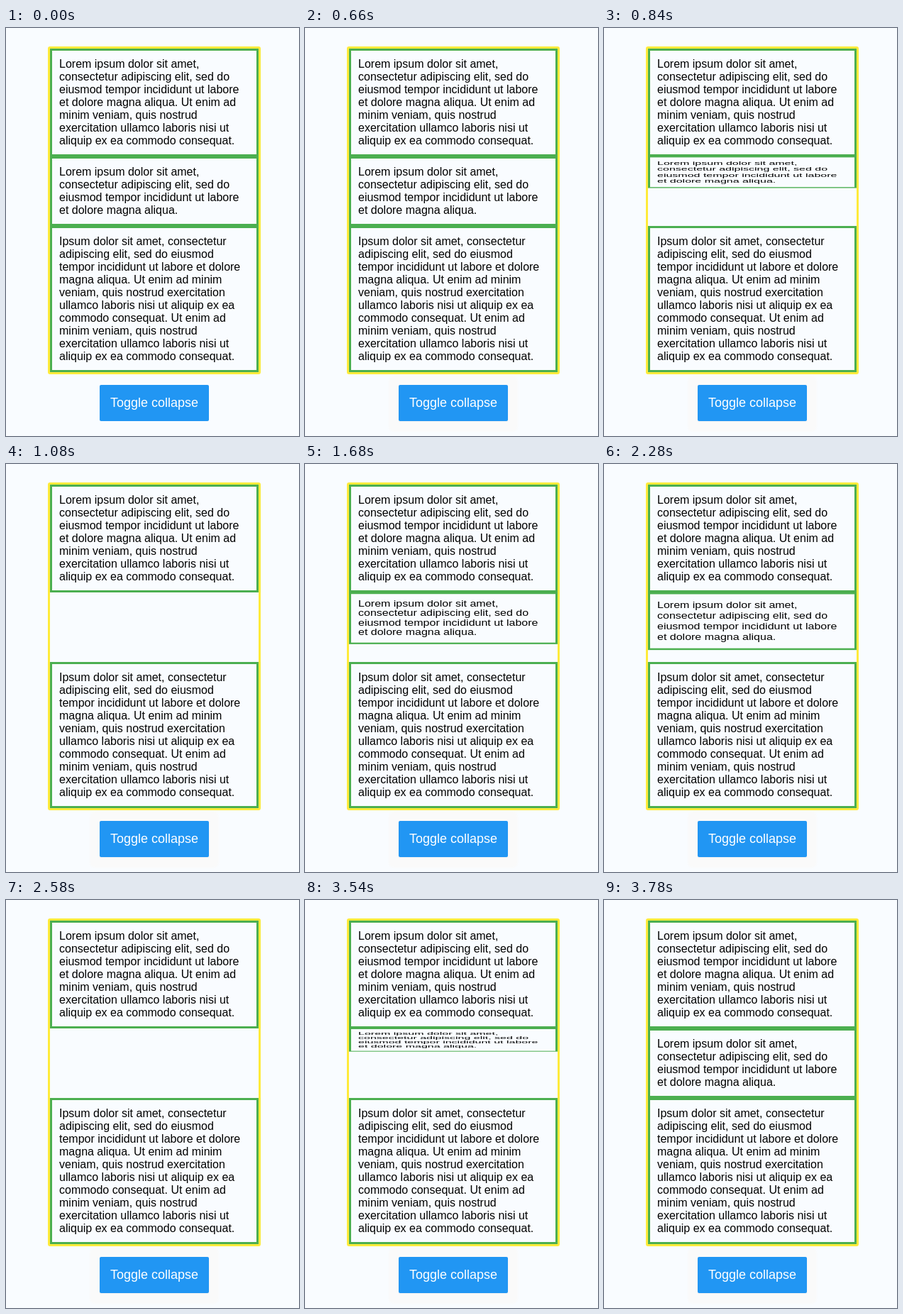
Animation, 413 px wide and 575 px high, one loop 4140 ms. Source, as an HTML page:

```html
<!DOCTYPE html>
<html lang="en">
<head>
<meta charset="utf-8">
<title>Toggle collapse</title>
<style>
  html, body { margin: 0; width: 100%; height: 100%; overflow: hidden; background: #f9fcff; }
  body { font: 16px/18px "Liberation Sans", Arial, sans-serif; color: #000; }
  .list {
    position: absolute; left: 59px; top: 26px; width: 294px;
    border: 3px solid #ffeb3b; border-radius: 3px;
  }
  .item { padding: 10px; border: 3px solid #4caf50; white-space: pre; }
  #panel { transform-origin: top; }
  #button {
    position: absolute; left: 132px; top: 503px; width: 154px; height: 51px;
    border-radius: 2px; background: #2196f3; color: #fff;
    font-size: 18px; line-height: 51px; text-align: center;
  }
  #button.hover { box-shadow: 0 1px 2px rgba(0, 0, 0, .04), 0 1px 3px 14px #fafafa; }
</style>
</head>
<body>
<div class="list">
<div class="item">Lorem ipsum dolor sit amet,
consectetur adipiscing elit, sed do
eiusmod tempor incididunt ut labore
et dolore magna aliqua. Ut enim ad
minim veniam, quis nostrud
exercitation ullamco laboris nisi ut
aliquip ex ea commodo consequat.</div>
<div class="item" id="panel">Lorem ipsum dolor sit amet,
consectetur adipiscing elit, sed do
eiusmod tempor incididunt ut labore
et dolore magna aliqua.</div>
<div class="item">Ipsum dolor sit amet, consectetur
adipiscing elit, sed do eiusmod
tempor incididunt ut labore et dolore
magna aliqua. Ut enim ad minim
veniam, quis nostrud exercitation
ullamco laboris nisi ut aliquip ex ea
commodo consequat. Ut enim ad
minim veniam, quis nostrud
exercitation ullamco laboris nisi ut
aliquip ex ea commodo consequat.</div>
</div>
<div id="button">Toggle collapse</div>
<script>
const LOOP = 4140, STEP = 60, DURATION = 300, HOVER = 660;
const toggles = [745, 1546, 2237, 3475];
const panel = document.getElementById("panel");
const button = document.getElementById("button");

const bezier = (a, b, s) => 3 * (1 - s) ** 2 * s * a + 3 * (1 - s) * s * s * b + s ** 3;

// CSS "ease": cubic-bezier(.25, .1, .25, 1)
function ease(x) {
  if (x <= 0 || x >= 1) return x <= 0 ? 0 : 1;
  let low = 0, high = 1;
  for (let i = 0; i < 24; i++) {
    const mid = (low + high) / 2;
    if (bezier(.25, .25, mid) < x) low = mid; else high = mid;
  }
  return bezier(.1, 1, low);
}

function scaleAt(time) {
  let scale = 1;
  toggles.forEach((start, i) => {
    scale += (i % 2 ? 1 : -1) * ease((time - start) / DURATION);
  });
  return scale < .01 ? 0 : scale;
}

const origin = performance.now();
function draw() {
  const elapsed = Math.max(0, performance.now() - origin) % LOOP;
  const time = Math.floor(elapsed / STEP) * STEP;
  panel.style.transform = `scaleY(${scaleAt(time)})`;
  button.classList.toggle("hover", time >= HOVER);
  requestAnimationFrame(draw);
}
draw();
</script>
</body>
</html>
```
